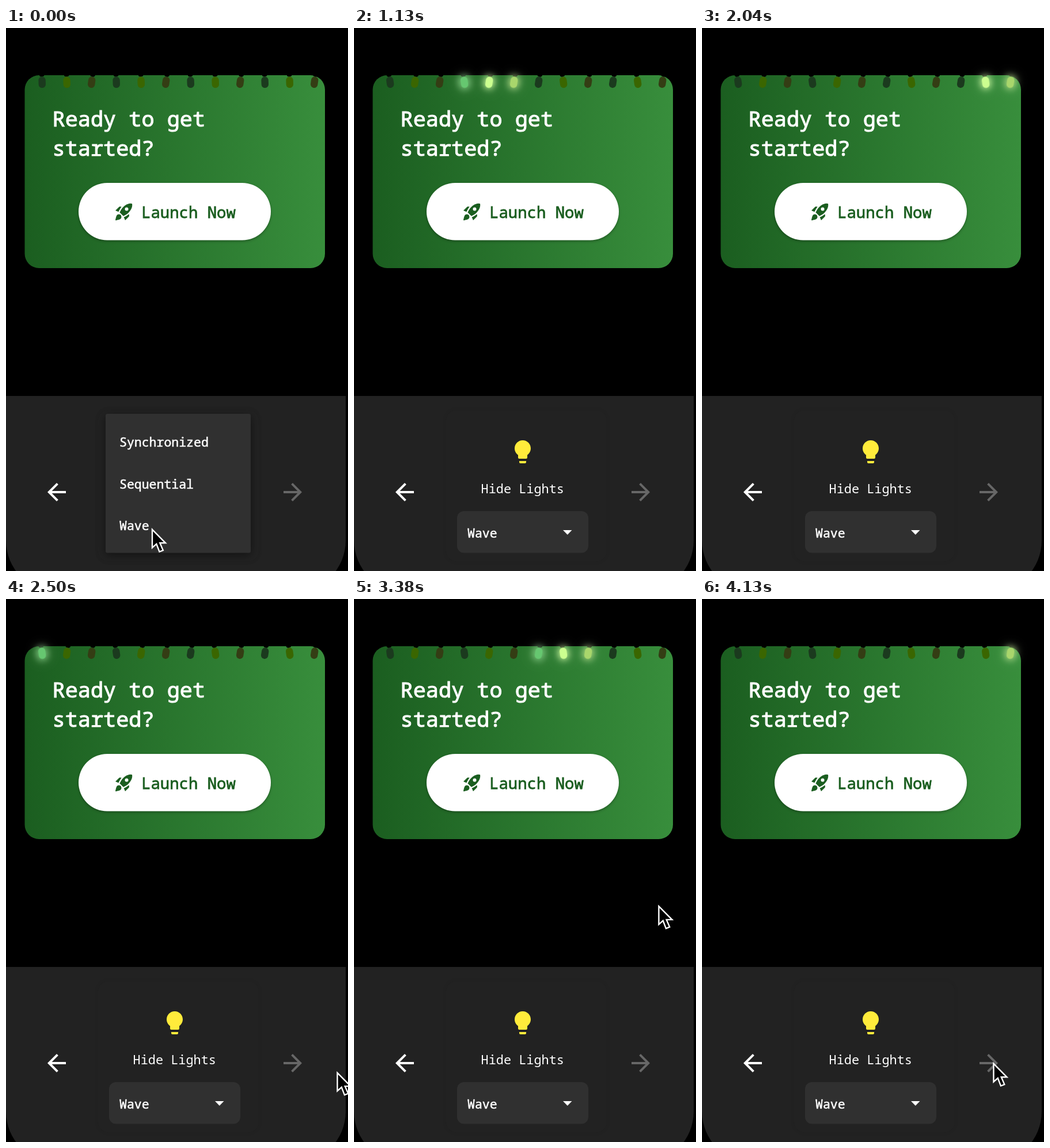
An HTML page for the animation above (4170 ms loop, 594 px wide and 943 px high).

```html
<!DOCTYPE html>
<html lang="en">
<head>
<meta charset="utf-8">
<title>Card with wave lights</title>
<style>
  html, body { margin: 0; width: 100%; height: 100%; overflow: hidden; background: #000; }
  svg { display: block; width: 594px; height: 943px; }
  text { font-family: "Roboto Mono", "Noto Sans Mono", "DejaVu Sans Mono", monospace; fill: #fff; stroke: #fff; white-space: pre; }
  .title { font-size: 36.9px; stroke-width: 1.1px; }
  .action { font-size: 27.3px; fill: #1b5e20; stroke: #1b5e20; stroke-width: .8px; }
  .item { font-size: 21.5px; stroke-width: .55px; }
  .label { font-size: 21.9px; stroke: none; }
  .raised { filter: drop-shadow(0 2px 2px rgba(0, 0, 0, .3)); }
  .panel { filter: drop-shadow(0 0 3px rgba(0, 0, 0, .08)); }
  #menu > rect { filter: drop-shadow(0 4px 8px rgba(0, 0, 0, .45)); }
</style>
</head>
<body>
<svg viewBox="0 0 594 943">
  <defs>
    <linearGradient id="green">
      <stop offset="0" stop-color="#1b5e20"/>
      <stop offset="1" stop-color="#388e3c"/>
    </linearGradient>
  </defs>
  <rect width="594" height="943"/>

  <rect x="32.5" y="82" width="521.5" height="335" rx="25" fill="url(#green)"/>
  <g id="lights"></g>
  <text class="title" x="80.5" y="170.5">Ready to get</text>
  <text class="title" x="80.5" y="222">started?</text>
  <rect class="raised" x="126" y="269" width="334" height="99.5" rx="49.7" fill="#fff"/>
  <path transform="translate(187 301) scale(1.5)" fill="#1b5e20" d="M9.19 6.35c-2.04 2.29-3.44 5.58-3.57 5.89L2 10.69l4.05-4.05c.47-.47 1.15-.68 1.81-.55zM11.17 17s3.74-1.55 5.89-3.7c5.4-5.4 4.5-9.62 4.21-10.57-.95-.3-5.17-1.19-10.57 4.21C8.55 9.09 7 12.83 7 12.83zM17.65 14.81c-2.29 2.04-5.58 3.44-5.89 3.57L13.31 22l4.05-4.05c.47-.47.68-1.15.55-1.81zM9 18c0 .83-.34 1.58-.88 2.12C6.94 21.3 2 22 2 22s.7-4.94 1.88-6.12A3 3 0 0 1 9 18z"/>
  <circle cx="209.5" cy="314.5" r="3" fill="#fff"/>
  <text class="action" x="235" y="329.5">Launch Now</text>

  <path d="M0 639H590V890a90 90 0 0 1-90 90H90a90 90 0 0 1-90-90z" fill="#222"/>
  <rect class="panel" x="160" y="664" width="279" height="262" rx="18" fill="#222"/>
  <path transform="translate(64 782) scale(2)" fill="#fff" d="M20 11H7.83l5.59-5.59L12 4l-8 8 8 8 1.41-1.41L7.83 13H20z"/>
  <path transform="translate(474 782) scale(2)" fill="#676767" d="M12 4l-1.41 1.41L16.17 11H4v2h12.17l-5.58 5.59L12 20l8-8z"/>
  <path transform="translate(269 712) scale(2)" fill="#ffeb3b" d="M9 21c0 .55.45 1 1 1h4c.55 0 1-.45 1-1v-1H9zM12 2C8.14 2 5 5.14 5 9c0 2.38 1.19 4.47 3 5.74V17c0 .55.45 1 1 1h6c.55 0 1-.45 1-1v-2.26c1.81-1.27 3-3.36 3-5.74 0-3.86-3.14-7-7-7z"/>
  <text class="label" x="220.5" y="808">Hide Lights</text>
  <rect x="179" y="839" width="228" height="72.5" rx="12" fill="#303030"/>
  <text class="item" x="197" y="884.5">Wave</text>
  <path d="M363 872h15.5l-7.75 8z" fill="#fff"/>

  <g id="menu">
    <rect x="173" y="670" width="252" height="241.5" rx="3" fill="#303030"/>
    <text class="item" x="197" y="727">Synchronized</text>
    <text class="item" x="197" y="799.5">Sequential</text>
    <text class="item" x="197" y="872">Wave</text>
  </g>

  <path id="cursor" d="M1 2V33.5L8.3 27L13.5 40.5L19.8 38L14.3 25.3H24z" stroke="#fff" stroke-width="2.4"/>
</svg>
<script>
const LOOP = 4170, COUNT = 12, GAP = 43;
const WAVE_START = 540, TICK = 125, REST = 3;
const $ = id => document.getElementById(id);
const clamp = v => Math.max(0, Math.min(1, v));
const linear = p => p;
const easeOut = p => 1 - (1 - p) ** 5;

// unlit and lit colours, repeating along the string
const COLORS = [["#1b3a1e", "#66c770"], ["#3a6600", "#ccff90"], ["#343d14", "#a9d66c"]];

// The bulbs hang at new angles once the wave is chosen.
const tiltBefore = i => i % 3 === 2 ? 8 : -2;
const tiltAfter = i => i * 5 % 7 < 2 ? -8 : 9;

// cursor visits: shown until `hide`, gliding between `start` and `end`
const VISITS = [
  { show: 0, start: 540, end: 711, hide: 745, from: [253, 869], to: [543, 846], ease: linear },
  { show: 2250, start: 2250, end: 2600, hide: 2600, from: [591, 833], to: [568, 816], ease: linear },
  { show: 3336, start: 3340, end: 3880, hide: 3880, from: [532, 406], to: [521, 791], ease: easeOut },
  { show: 3880, start: 3880, end: 4130, hide: LOOP, from: [521, 791], to: [505.5, 805], ease: linear }
];

function add(parent, tag, attrs) {
  const el = document.createElementNS("http://www.w3.org/2000/svg", tag);
  for (const key in attrs) el.setAttribute(key, attrs[key]);
  return parent.appendChild(el);
}

const bulbs = Array.from({ length: COUNT }, (_, i) => {
  const group = add($("lights"), "g");
  add(group, "rect", { x: -4.5, y: -18, width: 9, height: 8.2, rx: 4 });
  const glass = add(group, "rect", { x: -6.2, y: -9.7, width: 12.4, height: 19.4, rx: 6 });
  return { group, glass, x: 62.7 + i * GAP };
});

// Ticks come in pairs, the second one early; each lap ends in a short rest.
function waveHead(t) {
  if (t < WAVE_START) return -1;
  const lag = t > 3850 ? 40 : 0;
  const s = t - lag - WAVE_START + 2;
  const early = s % (2 * TICK) >= 88 ? 1 : 0;
  return (Math.floor(s / (2 * TICK)) * 2 + early) % (COUNT + REST);
}

function drawBulb({ group, glass, x }, i, t, head) {
  const lit = i <= head && i > head - 3;
  const [off, on] = COLORS[i % 3];
  const tilt = t < 290 ? tiltBefore(i) : tiltAfter(i);
  group.setAttribute("transform", `translate(${x} 94.3) rotate(${tilt})`);
  glass.setAttribute("fill", lit ? on : off);
  glass.style.filter = lit ? `drop-shadow(0 0 6px ${on}) drop-shadow(0 0 8px #d8f5c8b0)` : "none";
}

function drawCursor(t) {
  const visit = VISITS.find(v => t >= v.show && t < v.hide);
  $("cursor").setAttribute("visibility", visit ? "visible" : "hidden");
  if (!visit) return;
  const { start, end, from, to, ease } = visit;
  const p = ease(clamp((t - start) / (end - start)));
  const [x, y] = from.map((a, k) => a + (to[k] - a) * p);
  $("cursor").setAttribute("transform", `translate(${x} ${y})`);
}

function draw(t) {
  const head = waveHead(t);
  bulbs.forEach((bulb, i) => drawBulb(bulb, i, t, head));
  $("menu").setAttribute("opacity", clamp((320 - t) / 90));
  drawCursor(t);
}

const begin = performance.now();
function tick() {
  draw((performance.now() - begin) % LOOP);
  requestAnimationFrame(tick);
}
tick();
</script>
</body>
</html>
```
